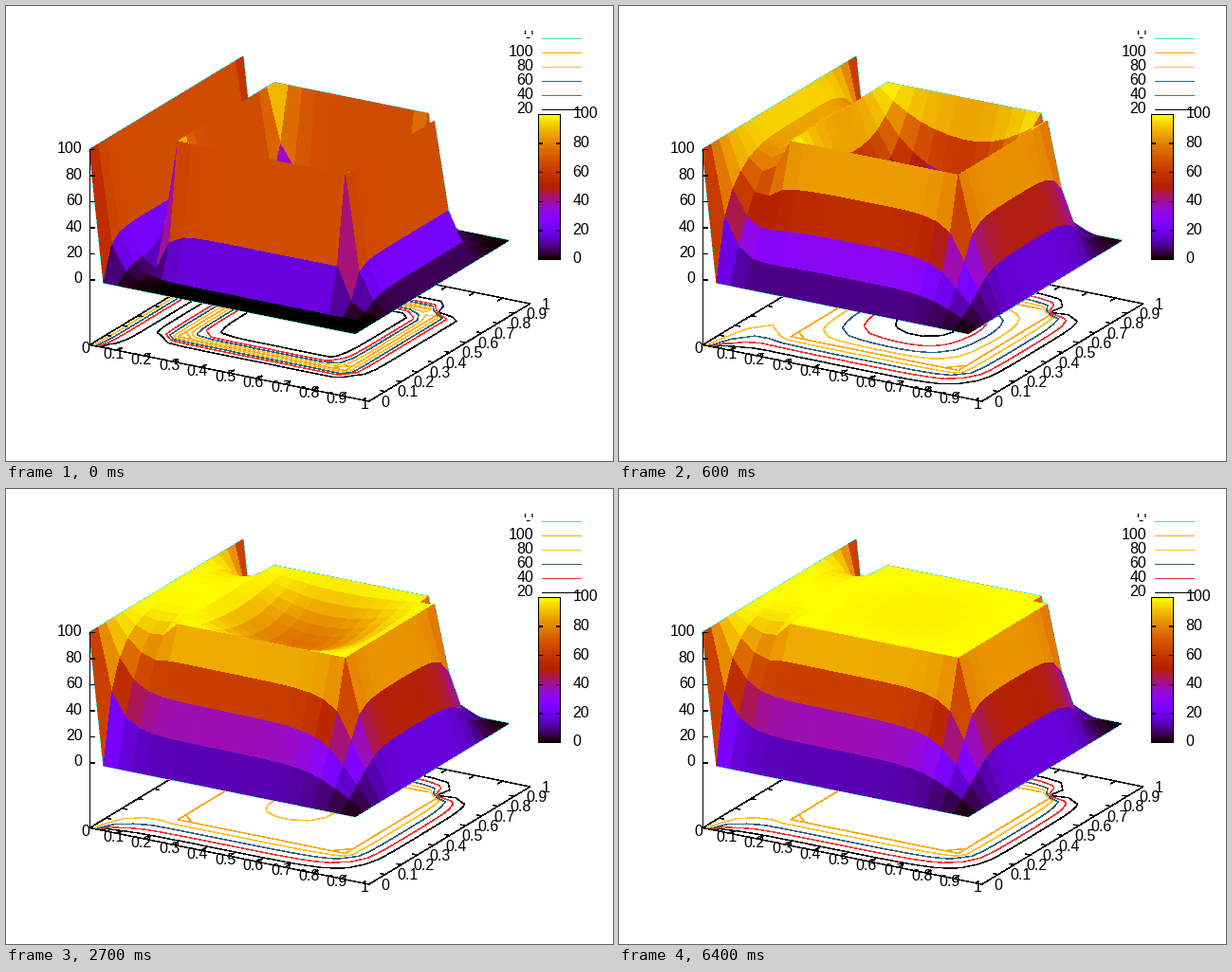
Recreate the animation shown at these times as a matplotlib script. Size 640 by 480 pixels, loop 6.9 s.

```python
import numpy as np
import matplotlib.pyplot as plt
from matplotlib.animation import FuncAnimation
from matplotlib.collections import LineCollection, PolyCollection
from matplotlib.colors import ListedColormap
from matplotlib.patches import Rectangle

plt.rcParams["path.snap"] = False

W, H, DPI = 640, 480, 100
PX = 72 / DPI                      # one pixel in points
HAIR = 0.4 * PX                    # aliased stroke that fills one pixel
N = 20                             # grid nodes per side
SWEEPS, FRAMES, INTERVAL = 65, 69, 100

TURQUOISE = "#40e0d0"
LEVELS = [20, 40, 60, 80, 99.999]
LINE_COLORS = ["#000000", "#f03232", "#306080", "#ffc020", "#ffa500"]

ORIGIN = np.array([87.8, 357.0])
X_AXIS = np.array([294.4, 59.5])
Y_AXIS = np.array([170.0, -103.0])
Z_UNIT = 206 / 150                 # pixels per degree
Z_FLOOR = 50                       # gap between the floor and z = 0


def project(x, y, z=-Z_FLOOR):
    """Orthographic view of (x, y, z) in stage pixels."""
    px = ORIGIN[0] + X_AXIS[0] * x + Y_AXIS[0] * y
    py = ORIGIN[1] + X_AXIS[1] * x + Y_AXIS[1] * y - Z_UNIT * (z + Z_FLOOR)
    return px, py


def palette(v):
    v = np.clip(v, 0, 1)
    rgb = [np.sqrt(v), v ** 3, np.clip(np.sin(2 * np.pi * v), 0, 1)]
    return np.stack(rgb, axis=-1)


def solve():
    """Gauss-Seidel sweeps of the Laplace equation; u[i, j] at (x_i, y_j)."""
    u = np.zeros((N, N))
    fixed = np.zeros((N, N), bool)
    fixed[[0, -1], :] = fixed[:, [0, -1]] = True
    fixed[[4, 16], 4:17] = fixed[4:17, [4, 16]] = True
    u[0, :] = 100
    u[[4, 16], 4:16] = u[4:16, [4, 16]] = 100   # the far corner stays cold
    free = np.argwhere(~fixed)
    states = []
    for _ in range(SWEEPS):
        for i, j in free:
            u[i, j] = (u[i - 1, j] + u[i + 1, j] + u[i, j - 1] + u[i, j + 1]) / 4
        states.append(u.copy())
    return states


states = solve()
gx, gy = np.meshgrid(np.arange(N) / N, np.arange(N) / N, indexing="ij")
floor_x, floor_y = project(gx, gy)

fig = plt.figure(figsize=(W / DPI, H / DPI), dpi=DPI, facecolor="white")
ax = fig.add_axes([0, 0, 1, 1])
ax.axis("off")


def line(p, q, color="black", z=2):
    ax.plot([p[0], q[0]], [p[1], q[1]], color=color, lw=HAIR,
            antialiased=False, zorder=z, solid_capstyle="butt")


def label(x, y, text, ha):
    ax.text(x, y + 4.8, text, ha=ha, va="baseline", zorder=6,
            family="Liberation Sans", fontsize=16 * PX)


def draw_axes():
    corners = [project(*c) for c in ((0, 0), (1, 0), (1, 1), (0, 1))]
    for a, b in zip(corners, corners[1:] + corners[:1]):
        line(a, b)
    line(project(0, 0), project(0, 0, 100), z=4)

    tx, ty = 0.017, 0.03
    for k in range(11):
        t, text = k / 10, f"{k / 10:g}"
        line(project(t, 0), project(t, ty))
        line(project(t, 1), project(t, 1 - ty))
        line(project(0, t), project(tx, t))
        line(project(1, t), project(1 - tx, t))
        x, y = project(t, 0)
        label(x - 4.3, y + 3.5, text, "center")
        x, y = project(1, t)
        label(x + 12.5, y + 1, text, "left")
    for z in range(0, 101, 20):
        x, y = project(0, 0, z)
        line((x, y), (x + 5, y), z=4)
        label(80, y - 1.2, str(z), "right")


def draw_key():
    names = ["'-'", "100", "80", "60", "40", "20"]
    for k, (name, color) in enumerate(zip(names, [TURQUOISE] + LINE_COLORS[::-1])):
        y = 34 + 15 * k
        label(555.7, y - 1, name, "right")
        line((565, y), (606, y), color, 5)


def draw_colorbar():
    left, right, top, bottom = 561, 584, 114, 267
    ax.imshow(np.linspace(1, 0, 128)[:, None], aspect="auto", zorder=4,
              cmap=ListedColormap(palette(np.linspace(0, 1, 128))),
              extent=(left, right, bottom, top), interpolation="nearest")
    ax.add_patch(Rectangle((left, top), right - left, bottom - top, fill=False,
                           lw=HAIR, antialiased=False, zorder=5))
    for z in range(0, 101, 20):
        y = bottom - (bottom - top) * z / 100
        line((left, y), (left + 4, y), z=5)
        line((right - 4, y), (right, y), z=5)
        label(597, y - 1, str(z), "left")


draw_axes()
draw_key()
draw_colorbar()
# Whole numbers fall on pixel centres.
ax.set_xlim(-0.5, W - 0.5)
ax.set_ylim(H - 0.5, -0.5)

mesh = LineCollection([], colors=TURQUOISE, linewidths=PX,
                      antialiaseds=False, zorder=3)
faces = PolyCollection([], antialiaseds=False, linewidths=0, zorder=3.5)
ax.add_collection(mesh, autolim=False)
ax.add_collection(faces, autolim=False)
floor_lines = []


def update(frame):
    u = states[min(frame, SWEEPS - 1)]

    while floor_lines:
        floor_lines.pop().remove()
    floor_lines.append(ax.contour(floor_x, floor_y, u, levels=LEVELS,
                                  colors=LINE_COLORS, linewidths=HAIR,
                                  antialiased=False, zorder=1.5))

    pts = np.stack(project(gx, gy, u), axis=-1)
    mesh.set_segments(list(pts) + list(pts.transpose(1, 0, 2)))

    # Paint from the far rows to the near ones.
    quads = np.stack([pts[:-1, :-1], pts[1:, :-1], pts[1:, 1:], pts[:-1, 1:]], axis=2)
    mean = (u[:-1, :-1] + u[1:, :-1] + u[1:, 1:] + u[:-1, 1:]) / 4
    faces.set_verts(quads.transpose(1, 0, 2, 3)[::-1].reshape(-1, 4, 2))
    faces.set_facecolor(palette(mean.T[::-1].ravel() / 100))
    return mesh, faces


anim = FuncAnimation(fig, update, frames=FRAMES, interval=INTERVAL,
                     repeat=True, repeat_delay=0, blit=False)
plt.show()
```
